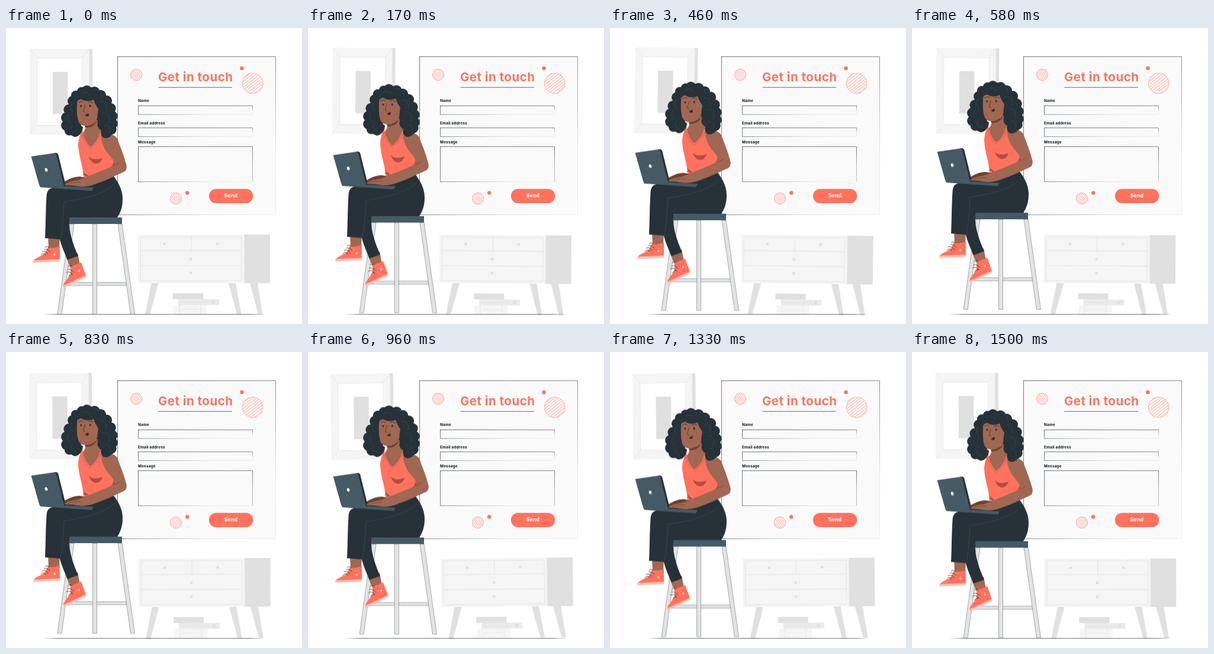
Write an HTML page that moves like this. It is 500x500 px and loops after 1.54 s.

```html
<!DOCTYPE html>
<html lang="en">
<head>
<meta charset="utf-8">
<title>Get in touch</title>
<style>
  html, body { margin: 0; width: 100%; height: 100%; overflow: hidden; background: #fff; }
  svg { display: block; width: 100%; height: 100%; }
  text { font-family: Inter, "Open Sans", sans-serif; font-weight: 700; }

  .sway { transform-origin: 250px 250px; animation: sway 1540ms linear infinite; }
  .float { animation: float 1540ms linear infinite; }
  @keyframes sway {
    0%, 45.8%, 100% { transform: rotate(0deg); }
    22.9% { transform: rotate(1deg); }
    72.9% { transform: rotate(-1deg); }
  }
  @keyframes float {
    0%, 100% { transform: translateY(0); }
    45.8% { transform: translateY(-9.6px); }
  }

  .pale { fill: #f5f5f5; }
  .mid { fill: #ebebeb; }
  .gray { fill: #e0e0e0; }
  .line { fill: none; stroke: #e0e0e0; stroke-width: .8; }
  .coral { fill: #ff725e; }
  .dark { fill: #263238; }
  .slate { fill: #455a64; }
  .skin { fill: #a06752; }
  .shade { fill: #70402f; }
  .ink { fill: none; stroke: #263238; stroke-width: .8; stroke-linecap: round; }
  .seam { fill: none; stroke: #455a64; stroke-width: .5; stroke-linecap: round; }
  .fade { fill: none; stroke: url(#fade); stroke-width: .65; }
  .label { font-size: 6.4px; letter-spacing: .12px; font-weight: 800; fill: #263238; }
  .ring { stroke: #ff725e; stroke-width: .5; }
  .stool { fill: #e3e3e3; stroke: #59656a; stroke-width: .5; }
</style>
</head>
<body>
<svg viewBox="0 0 500 500">
  <defs>
    <linearGradient id="fade" x1="0" y1="0" x2="1" y2="1">
      <stop offset="0" stop-color="#263238"/>
      <stop offset=".5" stop-color="#4a5459"/>
      <stop offset=".8" stop-color="#dcdedf"/>
      <stop offset="1" stop-color="#e6e6e6"/>
    </linearGradient>
    <linearGradient id="floor" gradientUnits="userSpaceOnUse" x1="64" y1="0" x2="436" y2="0">
      <stop offset="0" stop-color="#263238" stop-opacity=".1"/>
      <stop offset=".06" stop-color="#263238"/>
      <stop offset=".94" stop-color="#263238"/>
      <stop offset="1" stop-color="#263238" stop-opacity=".1"/>
    </linearGradient>
    <pattern id="fine" width="4" height="2.6" patternUnits="userSpaceOnUse" patternTransform="rotate(-60)">
      <path d="M0 1.3H4" stroke="#ff725e" stroke-width=".55"/>
    </pattern>
    <pattern id="wide" width="4" height="3.9" patternUnits="userSpaceOnUse" patternTransform="rotate(-38)">
      <path d="M0 2H4" stroke="#ff725e" stroke-width=".6"/>
    </pattern>
  </defs>

  <g class="sway">
    <!-- picture -->
    <path class="gray" d="M139 35H146V180H139Z"/>
    <path class="pale" d="M40 35H140.500V180H40Z"/>
    <path fill="#fff" d="M52.500 51H129V164.500H52.500Z"/>
    <path class="line" stroke-opacity=".8" d="M40 35L52.500 51H129L140.500 35M40 180L52.500 164.500H129L140.500 180M52.500 51V164.500M129 51V164.500"/>
    <path class="gray" d="M79 74H104.500V145.500H79Z"/>

    <!-- cabinet -->
    <path class="gray" d="M245.500 431H257.500L243 484H235ZM376 431H388L397.500 484H390ZM412 431H425L433.500 484H426Z"/>
    <path class="pale" d="M223 349H403V431H223Z"/>
    <path class="gray" d="M402.500 349H446V431H402.500Z"/>
    <path class="line" d="M227.500 353H398V427H227.500ZM227.500 376H398M227.500 401.500H398M313.500 353V376"/>
    <g class="gray">
      <circle cx="267.500" cy="364.500" r="2.300"/>
      <circle cx="357" cy="364.500" r="2.300"/>
      <circle cx="312.500" cy="390" r="2.300"/>
      <circle cx="312.500" cy="413.500" r="2.300"/>
    </g>

    <!-- books -->
    <path class="gray" d="M282 448H333V458H282Z"/>
    <path class="mid" d="M291 458H360V468H291Z"/>
    <path class="pale" d="M283 468H339V483.500H283Z"/>
    <circle class="gray" cx="350.500" cy="463" r="3"/>
    <path class="line" d="M294 463H345M293 468V483M329 468V483M297 475H325"/>
  </g>

  <!-- form -->
  <path fill="#fafafa" d="M188.500 48.500H455.500V315.500H188.500Z"/>
  <rect class="fade" x="188.500" y="48.500" width="267" height="267"/>
  <text class="coral" x="320.200" y="90" font-size="20.500" letter-spacing=".5" text-anchor="middle">Get in touch</text>
  <path d="M257.500 100.300H382" stroke="#263238" stroke-width=".7"/>
  <text class="label" x="223" y="125">Name</text>
  <text class="label" x="223" y="162.500">Email address</text>
  <text class="label" x="223" y="195.300">Message</text>
  <rect class="fade" x="223.400" y="131.600" width="193" height="14.500"/>
  <rect class="fade" x="223.400" y="168.800" width="193" height="14.500"/>
  <rect class="fade" x="223.400" y="200.500" width="193" height="59.300"/>
  <path d="M416.400 201V259.500" stroke="#263238" stroke-width=".5" stroke-opacity=".5"/>
  <rect class="coral" x="342.800" y="271.700" width="74.600" height="24.300" rx="12.150"/>
  <text x="380" y="286.300" font-size="8.600" letter-spacing=".25" text-anchor="middle" fill="#fff">Send</text>
  <circle class="ring" cx="220" cy="79" r="9.700" fill="url(#fine)"/>
  <circle class="ring" cx="287" cy="288" r="9.700" fill="url(#fine)"/>
  <circle class="ring" cx="416.700" cy="93.500" r="17.300" fill="url(#wide)"/>
  <circle class="coral" cx="398.500" cy="68" r="3.300"/>
  <circle class="coral" cx="306.200" cy="278.500" r="3.200"/>

  <path d="M64 483.700H436" stroke="url(#floor)" stroke-width=".7"/>

  <g class="float">
    <!-- stool -->
    <g class="stool">
      <path d="M102 429.800H204V435H102Z"/>
      <path d="M146.500 331H153.500V483.300H146.500Z"/>
      <path d="M108 331H115L94 483.300H87Z"/>
      <path d="M189 331H196L217.500 483.300H210.500Z"/>
    </g>
    <path class="slate" d="M102 320H196V331H106Z"/>
    <path class="seam" stroke="#263238" d="M120 323C145 321 170 326 195 322M140 327C155 322 165 330 180 327"/>

    <!-- far leg -->
    <path class="skin" d="M101 386L121 380L124.500 398L109 405Z"/>
    <path class="coral" d="M109 403L127 396L135.500 419L97 436C97 430 104 424 109 416Z"/>
    <path fill="#ffc0b6" d="M97 435L135 417.500L136 420.500L98 438.500Z"/>
    <circle cx="123.500" cy="410" r="1.700" fill="#ffd8d2"/>
    <path class="ink" d="M104 408C108 407 112 409 114 412M102 413C106 411 110 412 112 416M106 420C107 416 111 415 113 417M112 403C110 400 106 401 105 403"/>
    <path class="dark" d="M92 300L108 318C104 334 110 358 122 385L104 391.500C98 378 92 365 90 352Z"/>

    <!-- near leg -->
    <path class="skin" d="M71 352H91L90 372H72Z"/>
    <path class="coral" d="M71 370C77 373 84 371 91 368.500V392L46 394.500C48 388 61 386 66 380Z"/>
    <path fill="#ffc0b6" d="M46.500 392.500L91 390.500V394.500L46 396.500Z"/>
    <circle cx="82" cy="383" r="1.700" fill="#ffd8d2"/>
    <path class="ink" d="M65 374C69 373 73 375 74 378M61 378C66 376 70 379 71 382M59 384C61 380 66 380 67 384M73 371C70 368 67 369 66 371"/>
    <path class="dark" d="M131 253L180 248C189 259 197 273 197 288C197 304 193 312 188 320H107L97 322C95 340 93 350 91.500 357L66 355C67 335 67 305 68.500 284C69 275 73 270 82 269.500Z"/>
    <path class="seam" d="M184 263C160 285 125 288 98 294C97 315 95 340 92 356M180 250C184 256 187 258 192 270"/>

    <!-- back hair -->
    <path class="dark" d="M120 182A9 9 0 0 1 110 181A8 8 0 0 1 99 173A9 9 0 0 1 96 158A9 9 0 0 1 99 143A9 9 0 0 1 106 129A9 9 0 0 1 110 115A8 8 0 0 1 120 106A8 8 0 0 1 130 100A9 9 0 0 1 144 101A9 9 0 0 1 158 105A9 9 0 0 1 169 114A9 9 0 0 1 178 127A9 9 0 0 1 184 141A9 9 0 0 1 186 155A9 9 0 0 1 186 168A9 9 0 0 1 180 180A9 9 0 0 1 166 185L150 150H132Z"/>

    <!-- body -->
    <path class="skin" d="M134 155H156C156 168 159 175 168 178C180 180 188 185 190 193L178 225L126 215L124 186C126 178 136 176 134 163Z"/>
    <path class="shade" d="M133 163C142 165 149 162 154 156C151 165 143 169 133.500 168Z"/>
    <path class="coral" d="M129 172C130 183 135 194 142 201C150 196 157 186 158.500 176L161.500 177C162 194 172 210 184 222L193 234L181 249L131 254C131 236 123 218 122 199C122 188 125 180 129 172Z"/>
    <path fill="none" stroke="#b9513f" stroke-width=".9" stroke-dasharray="1.500 1" d="M128 180C130 190 136 198 142 204C151 198 158 189 160 180"/>
    <path fill="#b24e3e" d="M140 217C146 223 154 223 163 219C160 232 145 234 140 217Z"/>
    <path fill="#b24e3e" d="M182 222L193 233L168 241C177 236 182 232 182 222Z"/>
    <path class="ink" d="M131 244C134 246 136 250 136 253M130 248C135 247 138 249 140 252"/>

    <!-- laptop and arms -->
    <path class="shade" d="M98 260C104 256 114 251 125 251L140 254L128 266H98Z"/>
    <path class="slate" d="M57 264.500L148 269.500L145 275L58 269Z"/>
    <path class="dark" d="M81 211H85.500L88 213L101 266L97 269Z"/>
    <path class="slate" d="M42.500 217L82 211.300Q84 211 84.800 213.500L98.500 269L60 268.500Q57 268.500 56.200 265.500Z"/>
    <ellipse cx="68" cy="239.500" rx="2.300" ry="3.100" fill="#fff" transform="rotate(-14 68 239.500)"/>
    <path class="skin" d="M160.500 181C174 177 184 180 188 187C194 203 200 217 203.500 232C204.500 239 202 242 197 244C180 252 160 261 144 266C132 269 122 268 113 266L98 265C104 260 114 258 122 257C145 248 165 240 183 232C184 227 181 222 174 214C166 205 161 194 160.500 181Z"/>
    <path fill="none" stroke="#70402f" stroke-width=".7" d="M104 264C111 261 118 260 126 261M183 232C187 231 190 229 192 227"/>
    <path class="seam" d="M100 268L147 271"/>

    <!-- head -->
    <path class="skin" d="M121 116C119 132 119 147 122 157C125 166 136 167 144 163C153 158 158 148 159 134L157 112H124Z"/>
    <path class="dark" d="M119 128C119 122 124 121 127 120C134 125 144 124 148 121C150 129 154 133 156 137C154 148 154 152 155 160C153 166 157 171 161 173C159 180 163 186 168 186C175 186 180 181 181 174L184 150L172 116L145 100L122 112Z"/>
    <path class="dark" d="M121 120C118 135 119 150 122 158C124 165 130 166 130 168C129 176 124 184 115 184L100 165L105 130Z"/>
    <path class="ink" stroke-width="1.100" d="M122.500 126C125 123.800 128 123.800 130.500 125M139 126C142 124.200 145 124.500 147.500 126.500"/>
    <g class="dark">
      <ellipse cx="126.800" cy="131.800" rx="1.400" ry="1.900"/>
      <ellipse cx="142.200" cy="131.500" rx="1.400" ry="1.900"/>
    </g>
    <path fill="none" stroke="#60301f" stroke-width=".8" d="M133.500 130C132.500 135 131 138 130.500 141C131 142.500 132.500 142.500 134 142"/>
    <path fill="#4b2520" d="M133.500 147C135 145.200 137 145.500 139 144L140 147.500C138.500 150 135.500 150 133.500 147Z"/>

    <!-- curls -->
    <path class="seam" d="M127 111C133 107 139 109 141 114M150 104C158 105 163 111 162 118M158 124C166 123 172 130 169 138M164 144C174 143 178 152 173 160M167 165C174 164 178 170 175 176M112 127C107 133 109 139 113 142M107 146C101 152 104 159 110 160M112 164C107 170 112 177 118 176"/>
  </g>
</svg>
</body>
</html>
```
